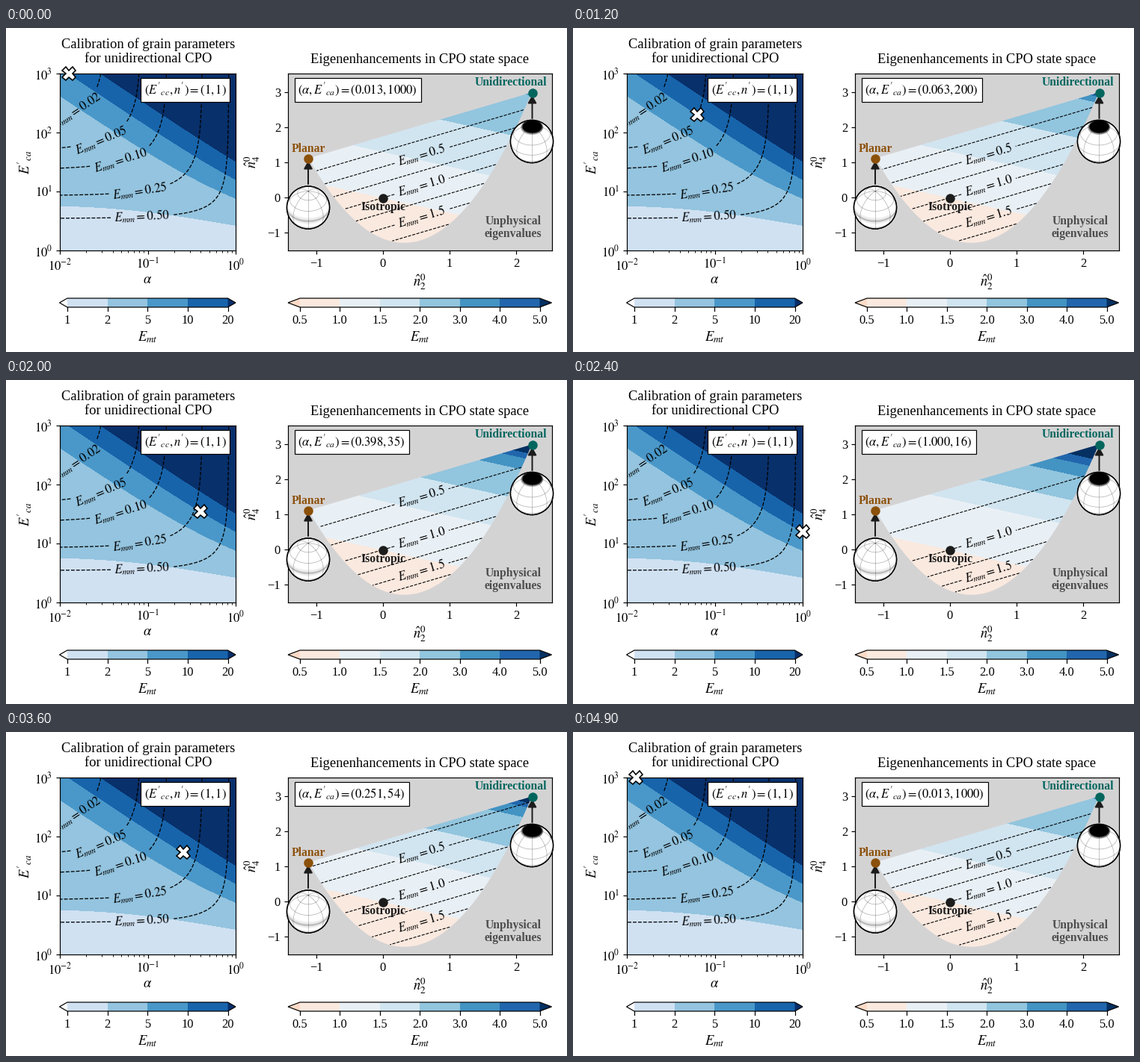
These frames come from a looping animation (750 by 434 pixels, 5 s). A matplotlib script:

```python
import numpy as np
import matplotlib.pyplot as plt
from matplotlib.animation import FuncAnimation
from matplotlib.patches import Circle, Polygon

W, H = 750, 434
FRAMES, INTERVAL = 50, 100
TEXT, TITLE, LINE = 16.5, 18.5, 1.2
BLUES = ['#ffffff', '#d0e1f2', '#94c4df', '#4a98c9', '#1764ab', '#08306b']
REDBLUE = ['#fddbc7', '#fae9df', '#e9f0f5', '#d1e5f0', '#92c5de',
           '#4393c3', '#2166ac', '#053061']
MT_LEFT = [1, 2, 5, 10, 20]
MT_RIGHT = [0.5, 1, 1.5, 2, 3, 4, 5]
BROWN, TEAL, INK = '#8c510a', '#01665e', '#1c1c1c'

plt.rcParams.update({'font.family': 'Liberation Serif', 'mathtext.fontset': 'stix',
                     'font.size': TEXT, 'axes.linewidth': LINE})
fig = plt.figure(figsize=(W / 72, H / 72), dpi=72, facecolor='white')


def panel(x0, y0, x1, y1, xlim, ylim):
    ax = fig.add_axes([x0 / W, 1 - y1 / H, (x1 - x0) / W, (y1 - y0) / H])
    ax.set(xlim=xlim, ylim=ylim)
    ax.tick_params(length=5, width=LINE, pad=5, labelsize=TEXT)
    ax.tick_params(which='minor', length=3, width=0.9)
    return ax


def enhancement(p, alpha, E):
    """Mixed Sachs/Taylor enhancement; p is the mean weight of grain basal shear."""
    sachs = (1 + (E - 1) * p) / (1 + 0.4 * (E - 1))
    taylor = (3 + 2 / E) / 5 / (1 + (1 / E - 1) * p)
    return (1 - alpha) * sachs + alpha * taylor


def mode_weights(n2, n4):
    """Weights of the axial (mm) and shear (mt) modes for an axisymmetric fabric."""
    c2 = (2 * n2 / np.sqrt(5) + 1) / 3
    c4 = (8 * n4 / 3 + 30 * c2 - 3) / 35
    return np.clip(3 * (c2 - c4), 0, 1), np.clip((4 * c4 - 3 * c2 + 1) / 2, 0, 1)


def n4_of(c2):
    return 3 * (35 * c2**2 - 30 * c2 + 3) / 8


# Left panel: logarithms of alpha and E'ca on linear axes
left = panel(72, 61, 307, 298, (-2, 0), (0, 3))
left.set_xticks([-2, -1, 0], [f'$10^{{{k}}}$' for k in (-2, -1, 0)])
left.set_yticks(range(4), [f'$10^{k}$' for k in range(4)])
left.set_xticks([d + np.log10(k) for d in (-2, -1) for k in range(2, 10)], minor=True)

X, Y = np.meshgrid(np.linspace(-2.4, 0, 241), np.linspace(0, 3, 241))
left.contourf(X, Y, enhancement(1, 10**X, 10**Y), MT_LEFT, colors=BLUES, extend='both')
mm_left = left.contour(X, Y, enhancement(0, 10**X, 10**Y), [0.02, 0.05, 0.1, 0.25, 0.5],
                       colors='k', linestyles='--', linewidths=1.3)
left.set(xlim=(-2, 0), ylim=(0, 3))
spots = [(92, 107), (127, 150), (153, 176), (179, 218), (182, 252)]
mm_left.clabel(fmt=lambda v: rf'$E_{{mm}} = {v:.2f}$', fontsize=TEXT,
               manual=[((x - 72) / 117.5 - 2, (298 - y) / 79) for x, y in spots])
for label in mm_left.labelTexts:
    label.set(clip_on=True, clip_box=left.bbox)
marker, = left.plot([], [], 'X', ms=18, mfc='white', mec='k', mew=1.6,
                    clip_on=False, zorder=9)

# Right panel: state space of the fabric
right = panel(377, 61, 730, 298, (-1.427, 2.54), (-1.504, 3.54))
right.set_autoscale_on(False)
right.set_facecolor('#d4d3d4')
right.set_xticks([-1, 0, 1, 2])
right.set_yticks([-1, 0, 1, 2, 3])
N2, N4 = np.meshgrid(np.linspace(-1.2, 2.3, 260), np.linspace(-1.35, 3.05, 260))
P_MM, P_MT = mode_weights(N2, N4)
chord = lambda n2: 1.125 + 1.875 * (n2 / np.sqrt(5) + 0.5) / 1.5
floor = lambda n2: n4_of((2 * n2 / np.sqrt(5) + 1) / 3)
outside = (N4 < floor(N2)) | (N4 > chord(N2))
u = np.linspace(0, 1, 120)
region = Polygon(np.c_[np.sqrt(5) * (3 * u - 1) / 2, n4_of(u)], fc='none', ec='none')
right.add_patch(region)

# Overlay in pixel coordinates
top = fig.add_axes([0, 0, 1, 1], zorder=5)
top.axis('off')


def write(x, y, s, size=TEXT, **kw):
    return top.text(x, y, s, fontsize=size, **{'ha': 'center', 'va': 'center', **kw})


def bold(x, y, s, color):
    write(x, y, s, 15.6, weight='bold', color=color, va='baseline')


def colorbar(x0, x1, tip, levels, colors, names):
    y0, y1, mid = 362, 374, 368
    edges = np.linspace(x0, x1, len(levels))
    for a, b, c in zip(edges, edges[1:], colors[1:]):
        top.fill([a, b, b, a], [y0, y0, y1, y1], fc=c, ec='none')
    top.fill([x0, x0 - tip, x0], [y0, mid, y1], fc=colors[0], ec='none')
    top.fill([x1, x1 + tip, x1], [y0, mid, y1], fc=colors[-1], ec='none')
    top.fill([x0 - tip, x0, x1, x1 + tip, x1, x0], [mid, y0, y0, mid, y1, y1],
             fc='none', ec='k', lw=LINE)
    for x, s in zip(edges, names):
        top.plot([x, x], [y1, y1 + 5], 'k', lw=LINE)
        write(x, 396, s, va='baseline')
    write((x0 + x1) / 2, 414, '$E_{mt}$', TITLE)


def sphere(cx, cy, r, n2, n4):
    """Orthographic globe shaded by the orientation distribution."""
    tilt = np.radians(40)
    su, cu = np.sin(tilt), np.cos(tilt)
    g = np.linspace(-1, 1, 240)
    a, b = np.meshgrid(g, -g)
    z = b * cu + np.sqrt(np.clip(1 - a**2 - b**2, 0, 1)) * su
    p2, p4 = (3 * z**2 - 1) / 2, (35 * z**4 - 30 * z**2 + 3) / 8
    odf = (1 + np.sqrt(5) * n2 * p2 + 3 * n4 * p4) / (4 * np.pi)
    shade = np.floor(np.clip((odf - 0.2) / 0.28, 0, 1) * 8) / 8
    disc = Circle((cx, cy), r, fc='white', ec='k', lw=1.5, zorder=3)
    top.add_patch(disc)
    image = top.imshow(shade, cmap='Greys', vmin=0, vmax=1, aspect='auto', zorder=3.1,
                       extent=(cx - r, cx + r, cy + r, cy - r))
    image.set_clip_path(disc)

    def arc(lat, lon):
        lat, lon = np.radians(lat), np.radians(lon)
        x = np.cos(lat) * np.sin(lon)
        y = np.sin(lat) * cu - np.cos(lat) * np.cos(lon) * su
        depth = np.sin(lat) * su + np.cos(lat) * np.cos(lon) * cu
        x = np.where(depth < 0, np.nan, x)
        top.plot(cx + r * x, cy - r * y, color='k', alpha=0.28, lw=0.8, zorder=3.2)

    for lat in range(-60, 90, 30):
        arc(lat, np.linspace(-180, 180, 121))
    for lon in range(-180, 180, 45):
        arc(np.linspace(-90, 90, 91), lon)
    top.add_patch(Circle((cx, cy), r, fc='none', ec='k', lw=1.5, zorder=3.3))


def arrow(x, y0, y1):
    top.annotate('', (x, y1), (x, y0), zorder=4, arrowprops=dict(
        arrowstyle='-|>,head_width=0.28,head_length=0.5', mutation_scale=17,
        lw=2, color=INK, shrinkA=0, shrinkB=0))


for x, y, s in [(190, 27, 'Calibration of grain parameters'),
                (190, 46, 'for unidirectional CPO'),
                (553, 47, 'Eigenenhancements in CPO state space')]:
    write(x, y, s, TITLE, va='baseline')
write(189, 338, r'$\alpha$', TITLE)
write(553, 340, r'$\hat{n}_2^0$', TITLE)
write(24, 180, r"$E'_{ca}$", TITLE, rotation=90)
write(329, 179, r'$\hat{n}_4^0$', TITLE, rotation=90)

colorbar(82, 296.5, 10.5, MT_LEFT, BLUES, [str(v) for v in MT_LEFT])
colorbar(393, 713.5, 16, MT_RIGHT, REDBLUE, [f'{v:.1f}' for v in MT_RIGHT])

sphere(404, 240.5, 28.5, -np.sqrt(5) / 2, 1.125)
sphere(703, 152, 28.5, np.sqrt(5), 3)
arrow(404, 209, 178)
arrow(703.5, 121, 90)
for x, y, c in [(404, 174.5, BROWN), (703.5, 86.5, TEAL), (504, 227.5, INK)]:
    top.plot(x, y, 'o', ms=12.5, color=c, mew=0, zorder=5)
bold(404, 166, 'Planar', BROWN)
bold(675, 77, 'Unidirectional', TEAL)
bold(504.5, 244, 'Isotropic', INK)
bold(678, 263, 'Unphysical', '#4d4d4d')
bold(678, 280, 'eigenvalues', '#4d4d4d')

frame = dict(boxstyle='square,pad=0.3', fc='white', ec='k', lw=LINE)
write(239.5, 83, r"$(E'_{cc}, n') = (1, 1)$", bbox=frame)
state = write(390.5, 83, '', ha='left', bbox=frame)
top.set(xlim=(0, W), ylim=(H, 0))

# Path along the Emt = 10 contour
LOG_ALPHA = [-1.9, -1.6, -1.1, -0.8, -0.4, -0.1, 0]
LOG_E = np.log10([1000, 500, 159, 84, 35, 19.2, 16])
LABEL_N2 = 0.58
drawn = []


def dashed(values, levels):
    return right.contour(N2, N4, values, levels, colors='k', linestyles='--',
                         linewidths=1.1, zorder=2)


def draw(i):
    step = min(np.clip(i - 5, 0, 19), 49 - i)
    x = -1.9 + 0.10001 * step
    y = np.interp(x, LOG_ALPHA, LOG_E)
    alpha, E = 10**x, 10**y
    marker.set_data([x], [y])
    state.set_text(rf"$(\alpha, E'_{{ca}}) = ({alpha:.3f}, {E:.0f})$")

    while drawn:
        drawn.pop().remove()
    fill = right.contourf(N2, N4, enhancement(P_MT, alpha, E), MT_RIGHT,
                          colors=REDBLUE, extend='both', zorder=1)
    fill.set_clip_path(region)

    # Labels sit where each level crosses one vertical line
    n4 = np.linspace(chord(LABEL_N2), floor(LABEL_N2), 300)
    column = enhancement(mode_weights(LABEL_N2, n4)[0], alpha, E)
    named = [v for v in (0.5, 1.0, 1.5) if column[0] + 0.02 < v < column[-1]]
    mm = np.ma.array(enhancement(P_MM, alpha, E), mask=outside)
    plain = dashed(mm, [v for v in np.arange(0.25, 2, 0.25) if v not in named])
    lines = dashed(mm, named)
    lines.clabel(fmt=lambda v: rf'$E_{{mm}} = {v:.1f}$', fontsize=TEXT,
                 manual=[(LABEL_N2, np.interp(v, column, n4)) for v in named])
    drawn.extend([fill, plain, lines])
    return []


anim = FuncAnimation(fig, draw, frames=FRAMES, interval=INTERVAL, repeat=True,
                     repeat_delay=0, blit=False)
plt.show()
```
